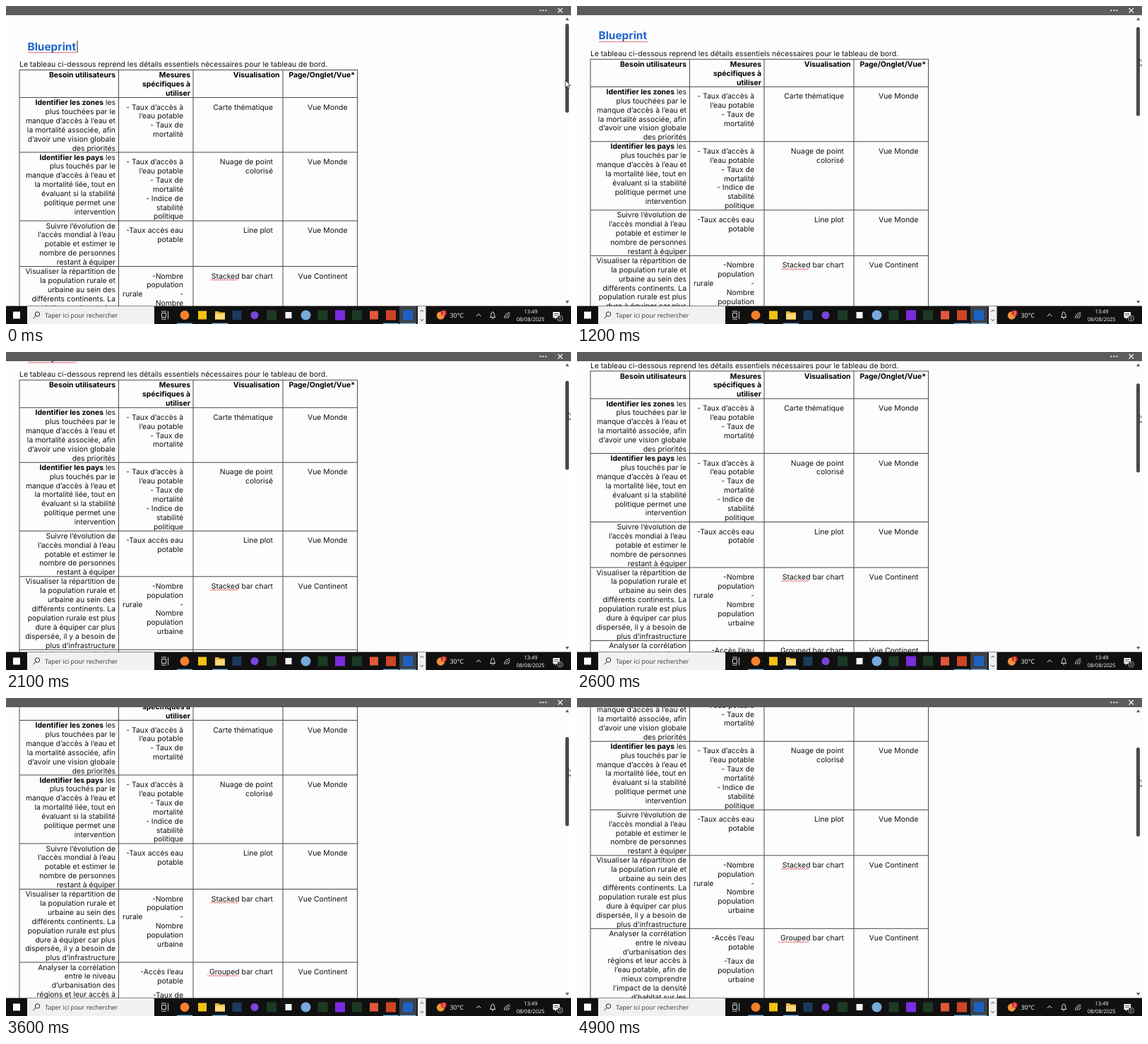
Recreate the animation shown at these times as an HTML page. Size 800x450 px, loop 5 s.

```html
<!DOCTYPE html>
<html lang="fr">
<head>
<meta charset="utf-8">
<title>Blueprint</title>
<style>
html, body { margin: 0; width: 100%; height: 100%; overflow: hidden; background: #fdfdfd; }
svg { display: block; width: 800px; height: 450px; text-rendering: geometricPrecision; }
#page { font: 10.4px Inter, "Open Sans", sans-serif; fill: #111; }
.b { font-weight: 700; fill: #000; }
.end { text-anchor: end; }
.rule { fill: none; stroke: #484848; }
.wave { fill: none; stroke: #e0303a; stroke-width: .8; }
#bar { font: 8.9px "Open Sans", "Noto Sans", sans-serif; fill: #fff; }
.line { fill: none; stroke: #eee; }
</style>
</head>
<body>
<svg viewBox="0 0 800 450">
  <rect width="800" height="450" fill="#fdfdfd"/>
  <g id="page">
    <text class="b" x="30.5" y="62.6" style="font-size:15.4px;fill:#1f66c7">Blueprint</text>
    <path id="caret" d="M101 49V66" stroke="#222"/>
    <text x="19" y="86">Le tableau ci-dessous reprend les détails essentiels nécessaires pour le tableau de bord.</text>
  </g>

  <rect width="800" height="13" fill="#5c5c5c"/>
  <g fill="#fff"><circle cx="756.5" cy="6.3" r="1.1"/><circle cx="760.5" cy="6.3" r="1.1"/><circle cx="764.5" cy="6.3" r="1.1"/></g>
  <path d="M781.5 3l6.5 6.5m0-6.5l-6.5 6.5" stroke="#fff" stroke-width="1.1"/>
  <path d="M792 20.3l2.7-4 2.7 4zM792 417l2.7 4 2.7-4z" fill="#606060"/>
  <rect id="thumb" x="792" width="5" height="126" rx="2.5" fill="#4a4a4a"/>

  <g id="bar">
    <rect y="424.5" width="800" height="25.5" fill="#101010"/>
    <rect x="10" y="432.5" width="10" height="10"/>
    <rect x="30" y="425" width="180" height="25" fill="#f1f1f1"/>
    <g fill="none" stroke="#222"><circle cx="44.5" cy="436" r="3.2"/><path d="M42.2 438.4l-3.7 3.9"/></g>
    <text x="55" y="441" fill="#333">Taper ici pour rechercher</text>
    <path class="line" d="M220.5 434.5h6v6h-6zM220 432h7m-7 11h7M229.5 432v11" stroke-width=".9"/>
    <rect x="557" y="425" width="24.5" height="25" fill="#3d4147"/>
    <g id="apps"></g>
    <path d="M296 432h5l1.5 1.5h7.5v10h-14z" fill="#e9b43c"/>
    <path d="M296 435.5h14v8h-14z" fill="#fbd977"/>
    <rect x="583" y="425" width="11.5" height="25" fill="#f0f0f0"/>
    <path d="M586.6 432.5l2.2-2.3 2.2 2.3m-4.4 10.7l2.2 2.3 2.2-2.3" fill="none" stroke="#333"/>
    <circle cx="615.5" cy="438" r="5.7" fill="#f0913a"/>
    <circle cx="619.7" cy="434.5" r="4" fill="#d92b2b"/>
    <text x="619.7" y="436.8" text-anchor="middle" font-size="6.3">2</text>
    <text x="628.5" y="441">30°C</text>
    <path class="line" d="M666 439l3.2-3.3 3.2 3.3"/>
    <path class="line" d="M685.7 440.5c1.4-1.6.8-7.5 3.5-7.5s2.1 5.900 3.500 7.500zm2.500 1.700h2"/>
    <g class="line" stroke-width=".9"><path d="M705.500 442a8 8 0 0 1 8-8M708 442a5.500 5.500 0 0 1 5.500-5.500M710.500 442a3 3 0 0 1 3-3"/></g>
    <g text-anchor="middle" font-size="7.500"><text x="743" y="434.700">13:49</text><text x="742.700" y="446.300">08/08/2025</text></g>
    <path d="M774.500 433h9.500v8h-5l-2 2.500v-2.500h-2.500z"/>
    <path d="M776 435.500h6.500m-6.500 2.500h6.500" stroke="#222" stroke-width=".8"/>
    <circle cx="784.500" cy="442" r="4" fill="#222" stroke="#ccc" stroke-width=".7"/>
    <text x="784.500" y="444.300" text-anchor="middle" font-size="6">1</text>
  </g>
  <path id="mouse" d="M0 0V10.500L2.400 8.200 4 12 5.600 11.300 4 7.700H7.300Z" fill="#fff" stroke="#111" stroke-width=".8"/>
</svg>
<script>
const $ = id => document.getElementById(id);
const add = (id, html) => $(id).insertAdjacentHTML('beforeend', html);
const PITCH = 12.9;

// Each row: top, then four cells; lines split by |, bold between *
const rows = [
  [90.5, '*Besoin utilisateurs*', '*Mesures*|*spécifiques à*|*utiliser*', '*Visualisation*', '*Page/Onglet/Vue**'],
  [129.5, '*Identifier les zones* les|plus touchées par le|manque d’accès à l’eau et|la mortalité associée, afin|d’avoir une vision globale|des priorités',
    '- Taux d’accès à|l’eau potable|- Taux de|mortalité', 'Carte thématique', 'Vue Monde'],
  [207, '*Identifier les pays* les|plus touchés par le|manque d’accès à l’eau et|la mortalité liée, tout en|évaluant si la stabilité|politique permet une|intervention',
    '- Taux d’accès à|l’eau potable|- Taux de|mortalité|- Indice de|stabilité|politique', 'Nuage de point|colorisé', 'Vue Monde'],
  [304, 'Suivre l’évolution de|l’accès mondial à l’eau|potable et estimer le|nombre de personnes|restant à équiper',
    '-Taux accès eau|potable', 'Line plot', 'Vue Monde'],
  [368.5, 'Visualiser la répartition de|la population rurale et|urbaine au sein des|différents continents. La|population rurale est plus|dure à équiper car plus|dispersée, il y a besoin de|plus d’infrastructure',
    '-Nombre|population|-|Nombre|population|urbaine', 'Stacked bar chart', 'Vue Continent'],
  [472, 'Analyser la corrélation|entre le niveau|d’urbanisation des|régions et leur accès à|l’eau potable, afin de|mieux comprendre|l’impact de la densité|d’habitat sur les',
    '-Accès l’eau|potable||-Taux de|population|urbaine', 'Grouped bar chart', 'Vue Continent']
];

rows.forEach(([top, ...cells], r) => {
  add('page', `<path class="rule" d="M19 ${top}H497.5"/>`);
  cells.forEach((cell, c) => {
    const x = (r ? [155, 251, 378, 483.5] : [155, 261, 387.5, 494])[c];
    let y = top + (r && c ? 17 : 10.5);
    for (const line of cell.split('|')) {
      const text = line.replace(/\*(.+)\*/, '<tspan class="b">$1</tspan>');
      add('page', `<text class="end" x="${x}" y="${y}">${text}</text>`);
      y += line ? PITCH : 7;
    }
  });
});
add('page', '<text x="165" y="411.300">rurale</text>');
for (const x of [19, 159.5, 265, 392, 497.5])
  add('page', `<path class="rule" d="M${x} 90V600"/>`);

function wave(x, end, y) {
  let d = `M${x} ${y}`;
  for (let i = 1; x + i * 1.5 <= end; i++) d += `L${x + i * 1.5} ${y + (i % 2) * 1.4}`;
  add('page', `<path class="wave" d="${d}"/>`);
}
wave(31, 101, 65);
wave(289, 329, 386.8);
wave(285, 329, 490.3);

// Taskbar icons: centre, colour, half size, round
const dark = '#1c3a24';
[[253, '#f4802b', 6.5, 1], [278, '#f0c30f', 6], [327, '#1d3a5c', 6.5], [352, '#7a45d8', 5.5, 1],
 [376, dark, 7], [400, '#f4f4f4', 4.5], [424.5, '#75aadb', 7, 1], [448.5, dark, 7],
 [473, '#7a2ce0', 7], [497, dark, 7], [521, '#e2573c', 6], [545, '#cf4526', 7], [569, '#1c62c4', 7]
].forEach(([x, fill, h, round]) =>
  add('apps', `<rect x="${x - h}" y="${437.5 - h}" width="${2 * h}" height="${2 * h}" rx="${round ? h : 0}" fill="${fill}"/>`));
for (const x of [253, 303, 545, 569])
  add('apps', `<rect x="${x - 11}" y="448.700" width="22" height="1.300" fill="#76b9ed"/>`);

function at(keys, t) {
  const i = keys.findIndex(k => k[0] > t);
  if (i < 0) return keys[keys.length - 1][1];
  if (!i) return keys[0][1];
  const [t0, a] = keys[i - 1], [t1, b] = keys[i];
  return a + (b - a) * (t - t0) / (t1 - t0);
}
const scrollKeys = [[900, 0], [1700, 40.5], [2600, 63.5], [3600, 98], [4300, 122.3], [4900, 145.7]];

function draw(now) {
  const t = Math.floor(now % 5000 / 100) * 100;
  const scroll = at(scrollKeys, t), drag = scroll * .309;
  const mx = at([[0, 792], [600, 796.5]], t), my = at([[0, 105], [600, 70]], t);
  $('page').setAttribute('transform', `translate(0 ${-scroll})`);
  $('thumb').setAttribute('y', 25 + drag);
  $('mouse').setAttribute('transform', `translate(${mx} ${my + drag})`);
  $('caret').style.display = t < 500 ? '' : 'none';
}
function tick() {
  draw(performance.now());
  requestAnimationFrame(tick);
}
tick();
</script>
</body>
</html>
```
